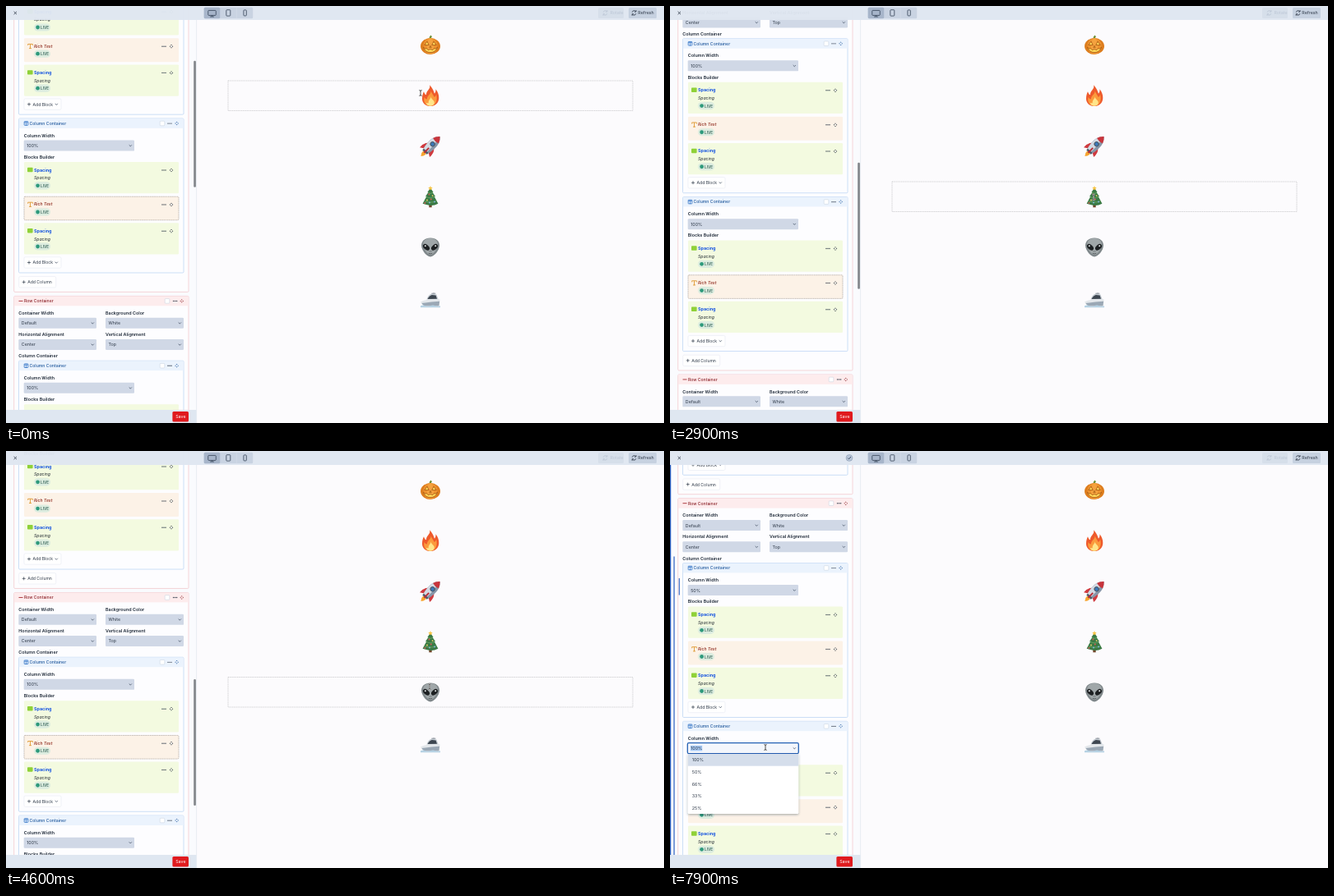
Recreate the animation shown at these times as an HTML page. Size 800 by 508 pixels, loop 8 s.

```html
<!DOCTYPE html>
<html lang="en">
<head>
<meta charset="utf-8">
<title>Block builder preview</title>
<style>
html, body { margin: 0; width: 100%; height: 100%; overflow: hidden; background: #fcfbfd; }
svg { display: block; width: 800px; height: 508px; }
text { font: 400 5.35px Inter, Roboto, sans-serif; fill: #2f3a49; white-space: pre; }
.label { font-weight: 600; font-size: 5.45px; fill: #202b39; }
.button { font-weight: 400; font-size: 5.1px; }
.column { font-weight: 500; font-size: 5.2px; fill: #235a9e; }
.row { font-weight: 500; font-size: 5.1px; fill: #8c2329; }
.spacing { font-weight: 700; font-size: 5.4px; fill: #1553e0; }
.rich { font-weight: 500; font-size: 5.1px; font-style: italic; fill: #8e2a1d; }
.italic { font-style: italic; font-size: 5.1px; fill: #20282f; }
.live { font-weight: 500; font-size: 4.7px; fill: #2b5b50; }
.white { fill: #fff; }
.pale { fill: #bcc6d5; }
</style>
</head>
<body>
<svg id="stage" viewBox="0 0 800 508" xmlns="http://www.w3.org/2000/svg"></svg>
<script>
const ROW_HEIGHT = 488, COLUMN_HEIGHT = 192.8, LOOP = 8000;

const rect = (x, y, w, h, fill, extra = '') =>
  `<rect x="${x}" y="${y}" width="${w}" height="${h}" fill="${fill}" ${extra}/>`;
const path = (d, fill, extra = '') => `<path d="${d}" fill="${fill}" ${extra}/>`;
const line = (d, color, width = 0.7, extra = '') =>
  path(d, 'none', `stroke="${color}" stroke-width="${width}" ${extra}`);
const circle = (x, y, r, fill, extra = '') => `<circle cx="${x}" cy="${y}" r="${r}" fill="${fill}" ${extra}/>`;
const ellipse = (x, y, rx, ry, fill, extra = '') =>
  `<ellipse cx="${x}" cy="${y}" rx="${rx}" ry="${ry}" fill="${fill}" ${extra}/>`;
// y is the vertical middle of the text
const text = (x, y, str, cls = '', extra = '') =>
  `<text x="${x}" y="${y + 1.9}" class="${cls}" ${extra}>${str}</text>`;
const group = (x, y, body, extra = '') => `<g transform="translate(${x} ${y})" ${extra}>${body}</g>`;
const chevron = (x, y) => line(`M${x - 1.6} ${y - .8}l1.6 1.6 1.6-1.6`, '#3f4d60', 0.75);
const plus = (x, y) => line(`M${x - 2} ${y}h4M${x} ${y - 2}v4`, '#2f3a49', 0.7);
const dots = (x, y) => [-2, 0, 2].map(d => circle(x + d, y, 0.7, '#2f3a49')).join('');
const mover = (x, y, color = '#1f2937') => [[0, -1], [1, 0], [0, 1], [-1, 0]].map(([a, b]) =>
  path(`M${x + a * 2.2} ${y + b * 2.2}l${-a + b} ${-b + a}l${-2 * b} ${-2 * a}z`, color)).join('');
const checkbox = (x, y) => rect(x - 2.8, y - 2.8, 5.6, 5.6, '#fff', 'rx=".8" stroke="#c3cedc" stroke-width=".5"');

const select = (x, y, w, value, id = '') =>
  rect(x, y - 6.5, w, 13, '#d0d8e6', 'rx="1.2"') +
  text(x + 3.5, y, value, '', id && `id="${id}"`) + chevron(x + w - 4.7, y);
const button = (x, y, w, label) =>
  rect(x, y - 6.7, w, 13.4, '#fff', 'rx="1.5" stroke="#e6eaf1" stroke-width=".6"') +
  plus(x + 6, y) + text(x + 10.5, y, label, 'button');
const badge = y =>
  rect(34, y - 4.6, 20, 9.2, '#dcecdf', 'rx="4.6"') +
  circle(38.6, y, 2.4, '#2f9a7c') + text(42, y + .1, 'LIVE', 'live');

const spacingBlock = y =>
  rect(22, y, 188, 38.3, '#f3fae0', 'rx="1.2"') +
  rect(26, y + 6.8, 6.6, 5.4, '#8fd138', 'rx=".8"') +
  text(34, y + 9.6, 'Spacing', 'spacing') + text(34, y + 19.4, 'Spacing', 'italic') +
  badge(y + 28.8) + dots(192, y + 10) + mover(201, y + 10);
const richBlock = (y, id) =>
  rect(22, y, 188, 29, '#fcf2e7', 'rx="1.2"') +
  line(`M26.7 ${y + 8.8}v-1.6h5.6v1.6M29.5 ${y + 7.2}v5.4M28 ${y + 12.4}h3`, '#e09a35', 0.9) +
  text(34, y + 9.5, 'Rich Text', 'rich') + badge(y + 19) + dots(192, y + 10) + mover(201, y + 10) +
  rect(22, y + .2, 188, 28.6, 'none',
    `id="${id}" rx="1.2" stroke="#958d86" stroke-width=".6" stroke-dasharray="1.4 .8"`);

const column = (r, c) => group(0, c * COLUMN_HEIGHT,
  rect(15.5, 136.5, 200.5, 188, '#fdfdff', 'rx="1.2" stroke="#b7d2f3" stroke-width=".7"') +
  rect(15.8, 136.8, 199.9, 11.6, '#ebf3fd') +
  rect(22.2, 140.2, 4.6, 4.6, 'none', 'rx=".5" stroke="#2b6fc4" stroke-width=".8"') +
  line('M22.2 141.4h4.6M24.5 141v4', '#2b6fc4') +
  text(28.4, 142.5, 'Column Container', 'column') +
  checkbox(190, 142.5) + dots(199, 142.6) + mover(207.6, 142.5, '#235a9e') +
  text(21.7, 157.2, 'Column Width', 'label') + select(21.7, 169.6, 134.3, '100%', `value${r}${c}`) +
  text(21.7, 183.5, 'Blocks Builder', 'label') +
  spacingBlock(189.5) + richBlock(231.5, `focus${r}${c}`) + spacingBlock(263.7) +
  button(22, 312, 45, 'Add Block') + chevron(61.3, 312));

const row = r => group(0, r * ROW_HEIGHT - 35,
  rect(9.7, 57.7, 212.3, 483, '#fdfdff', 'rx="1.2" stroke="#f3c3c7" stroke-width=".7"') +
  rect(10, 58, 211.7, 11.6, '#fdeced') +
  line('M15.5 63.7h5', '#a52a30', 0.9) + text(22, 63.7, 'Row Container', 'row') +
  checkbox(196, 63.7) + dots(205.6, 63.7) + mover(213.7, 63.7, '#8c2329') +
  text(15.3, 78.4, 'Container Width', 'label') + select(15.3, 90.6, 94.7, 'Default') +
  text(121, 78.4, 'Background Color', 'label') + select(121, 90.6, 95, 'White') +
  text(15.3, 104.5, 'Horizontal Alignment', 'label') + select(15.3, 116.8, 94.7, 'Center') +
  text(121, 104.5, 'Vertical Alignment', 'label') + select(121, 116.8, 95, 'Top') +
  text(15.3, 130.7, 'Column Container', 'label') +
  column(r, 0) + column(r, 1) + button(15.7, 528.6, 45, 'Add Column'));

const dropdown = `<g id="menu">` +
  rect(21.3, 163.2, 135, 12.9, '#f3f6fc', 'rx="1.5" stroke="#2360b4" stroke-width="1.3"') +
  rect(24.8, 166.3, 14.4, 6.6, '#a9cbf6') + text(25.2, 169.6, '100%') + chevron(151.3, 169.6) +
  rect(21.8, 176.6, 134.4, 72.8, '#fff', 'rx="1.2" filter="url(#shadow)"') +
  rect(21.8, 176.6, 134.4, 14.6, '#d5deeb', 'id="option"') +
  ['100%', '50%', '66%', '33%', '25%'].map((v, i) => text(26.8, 183.9 + i * 14.6, v)).join('') + '</g>';

const carved = 'stroke="#a4510f" stroke-width=".8" stroke-linejoin="round"';
const pumpkin =
  line('M-.3-7.5q-.3-2.4 1.6-3.6', '#6f8f35', 2.4) +
  ellipse(0, 1.4, 12, 10, '#dd7d1e') + ellipse(0, 1.2, 8.6, 9.8, '#ee9330') + ellipse(0, 1, 4, 9.6, '#f4a23f') +
  path('M-7.2 0l3.2-4.4L-1.8 0zM7.2 0L4-4.4 1.8 0zM-1.2 2.8L0 .8l1.2 2z', '#ffd75a', carved) +
  path('M-8.6 2.6l2.6 2 1.6-.6 1.6 2 2.8-1 2.8 1 1.6-2 1.6.6 2.6-2Q6.6 9 0 9T-8.6 2.6z', '#ffd75a', carved);
const fire =
  path('M-1-13C3-9 4-5 5-2.6 6.2-4 6.8-6 6.4-8 9.6-4 10.6 0 10.2 4 9.6 9.5 5 12.8 0 12.8S-9.7 9.5-10 4.4C-10.2 0-9-3-8-5-7.4-3-6.8-1.6-5-1-5.4-6 .8-8-1-13z', '#ee5a2c') +
  path('M.3-6C2-2.6 3.6-.6 4.8 1.6 6.2 1.2 7-.4 7-2 9 6 6.4 12.4 0 12.4-6.8 12.4-8.8 6-7.4 1.6-6.4 3.4-5.4 4-4 4.2-4.6-.6 1.6-2 .3-6z', '#fb9a3c') +
  path('M.6 1C.8 4.6 5 5.2 4.8 8.8 4.6 11.2 2.4 12.4 0 12.4S-5 11-4.8 8.4C-4 9-3 9.2-2.2 8.8-3 5.6.4 4.4.6 1z', '#ffe58a');
const rocket = `<g transform="rotate(44)">` +
  path('M-2.6 10Q-3 13.6 0 16.6 3 13.6 2.6 10z', '#f7a531') +
  path('M-4-2Q-9.5 2.4-8.4 10L-3.5 7zM4-2Q9.5 2.4 8.4 10L3.5 7z', '#cf3a3f') +
  path('M0-16.6C4-13.4 5.8-8 5.6-3 5.4 3 4.6 6.4 3.6 9.6h-7.2C-4.6 6.4-5.4 3-5.6-3-5.8-8-4-13.4 0-16.6z', '#8796a8') +
  path('M0-16.6C-4-13.4-5.8-8-5.6-3-5.4 3-4.6 6.4-3.6 9.6H1.4Q3 0 0-16.6z', '#d3dae3') +
  path('M0-16.6Q-3.6-13.6-4.8-9.4 0-7.8 4.8-9.4 3.6-13.6 0-16.6z', '#c8343b') +
  circle(0, -3.8, 2.6, '#3a78b8', 'stroke="#4a5866" stroke-width="1.1"') +
  rect(-3.8, 7.6, 7.6, 2.4, '#4f5a67') + path('M-1 2.6h2v8.4h-2z', '#b92c35') + '</g>';
const tree =
  rect(-1.7, 8, 3.4, 4.8, '#70462a') +
  path('M0-11L3.6-5.4 2.6-5.6 6-.4 4.6-.8 9.4 8.2Q4.6 10.8 0 10.4T-9.4 8.2L-4.6-.8-6-.4-2.6-5.6-3.6-5.4z', '#3a7a45') +
  line('M-3-5.2Q0-3 3-5.2M-5.4-.2Q0 3 5.4-.2M-7.4 5Q0 8.4 7.4 5', '#6ea765', 0.9) +
  path('M0-13.4l.8 1.8 1.9.2-1.4 1.3.4 1.9L0-9.1l-1.7.9.4-1.9-1.4-1.3 1.9-.2z', '#f6c445') +
  [[-1.6, -3, '#e2585a'], [2.6, -1.4, '#f5d469'], [-4, 4, '#f5d469'], [.8, 3, '#e2585a'], [5, 6, '#7fb9e6'], [-1, 7, '#7fb9e6'], [-6.6, 7.4, '#e2585a']]
    .map(([x, y, c]) => circle(x, y, 0.9, c)).join('');
const alien =
  path('M0-11.5C7-11.5 11-7.4 11-2.4 11 3.6 4.6 11.5 0 11.5S-11 3.6-11-2.4C-11-7.4-7-11.5 0-11.5z', '#7f878a') +
  path('M0-11C5-11 8.8-8 8.8-4 8.4 3 3.4 9 0 9S-8.4 3-8.8-4C-8.8-8-5-11 0-11z', '#a0a7a9') +
  ellipse(-5, -.2, 4.6, 2.9, '#1d2022', 'transform="rotate(42 -5 -.2)"') +
  ellipse(5, -.2, 4.6, 2.9, '#1d2022', 'transform="rotate(-42 5 -.2)"') +
  circle(-6.2, -1.8, 1, '#e9eced') + circle(6.2, -1.8, 1, '#e9eced') +
  line('M-.9 4.4v1M.9 4.4v1M-2.2 7.4q2.2 1 4.4 0', '#4a5052', 0.8);
const boat =
  path('M-4.6-1.4Q-2.4-7 1.6-8.2L7.4-7.4 9.8-1z', '#c4cbd2') +
  path('M-3.4-1.8Q-1.6-5.8 1.8-6.8L6.6-6.2 8-2z', '#3d4650') +
  line('M1.4-8.6h5M4-8.4v-1', '#7b848d', 0.9) +
  path('M-12 1.6Q-4-2.6 11.6-1.6L10.4 6.8H-7.4Q-10.8 4-12 1.6z', '#e3e7eb') +
  path('M-10.6 3.2Q0 1.8 11.2 1L10.4 6.8H-7.4Q-9.4 5.2-10.6 3.2z', '#9ba8b5') +
  path('M-12 6.4q3-1.2 6 0t6 0 6 0 6 0v2h-24z', '#b6d2e4');
const emojis = [pumpkin, fire, rocket, tree, alien, boat]
  .map((art, i) => group(516, [47.6, 109.3, 171, 232.5, 294, 358.8][i], art)).join('');

const device = (x, w, h) =>
  rect(x - w / 2, 8.4 - h / 2, w, h, 'none', 'rx=".8" stroke="#344256" stroke-width=".8"');
const turn = (x, color) =>
  line(`M${x - 2.3} 7.6a2.4 2.4 0 0 1 4.4-.8M${x + 2.3} 9.2a2.4 2.4 0 0 1-4.4 .8M${x + 2.4} 5v2h-2M${x - 2.4} 11.8v-2h2`, color, 0.8);
const toolbar =
  rect(0, 0, 800, 17, '#dfe7f1', 'fill-opacity=".97"') +
  line('M9.6 6.8l3.4 3.4M13 6.8l-3.4 3.4', '#2b3545', 0.8) +
  rect(240.7, 1.7, 59.5, 13.6, '#c9d3e2', 'rx="1.6"') + rect(240.7, 1.7, 19.5, 13.6, '#a7b5ca', 'rx="1.6"') +
  line('M280.3 1.7v13.6', '#d9e1ec', 0.5) +
  device(250.5, 9.5, 6) + line('M248 13h5M250.5 11.4v1.6', '#344256', 0.8) +
  device(270.3, 5, 7.4) + device(290.6, 3.4, 7) +
  rect(720, 2, 31, 13, '#d6dfea', 'rx="1.5"') + turn(728.5, '#bcc6d5') + text(734.5, 8.5, 'Rotate', 'pale') +
  rect(757, 2, 34, 13, '#c6d1e0', 'rx="1.5"') + turn(763.6, '#2b3545') + text(768.3, 8.5, 'Refresh');

const changed = `<g id="changed">` +
  rect(0, 17, 1.2, 475, '#2a5fc0') + rect(4.4, 128.5, 1.2, 363.5, '#2a5fc0') + rect(10.7, 155, 1.1, 20.5, '#2a5fc0') + '</g>';
const saved = `<g id="saved">` + circle(218, 8.4, 3.9, '#b9c7da', 'stroke="#7f90a8" stroke-width=".5"') +
  line('M216.2 8.5l1.3 1.4 2.4-2.9', '#33455f', 0.9) + '</g>';
const beam = 'M-1.6-3.4q1.6 0 1.6 1 0-1 1.6-1M0-2.6v5.2M-1.6 3.4q1.6 0 1.6-1 0 1 1.6 1';

const stage = document.getElementById('stage');
stage.innerHTML =
  `<defs><filter id="shadow" x="-10%" y="-10%" width="120%" height="130%">
    <feDropShadow dx="0" dy="1" stdDeviation="1.5" flood-color="#1f2d3d" flood-opacity=".4"/></filter></defs>` +
  rect(0, 0, 800, 508, '#fcfbfd') + rect(0, 0, 231.5, 508, '#fafbfe') +
  `<g id="doc">${row(0) + row(1) + row(2)}</g>` + changed + dropdown +
  rect(228.2, 0, 2.7, 154, '#83868b', 'id="thumb" rx="1.3"') +
  line('M231.6 17v491', '#e0e5ee', 0.7) +
  rect(0, 492, 231.5, 16, '#dfe7f1') + rect(202.4, 494, 19.6, 12.6, '#e01a1e', 'rx="1.5"') +
  text(206.2, 500.4, 'Save', 'white') +
  toolbar + saved + emojis +
  rect(270, 0, 492, 36.5, 'none', 'id="hover" stroke="#bdbdc1" stroke-width=".7" stroke-dasharray="1.3 .9"') +
  `<g id="cursor">${line(beam, '#fff', 1.5) + line(beam, '#1c1c1c', 0.8)}</g>`;

const $ = id => document.getElementById(id);
const show = (id, on) => $(id).setAttribute('visibility', on ? 'visible' : 'hidden');
const clamp = v => Math.min(1, Math.max(0, v));
const ease = v => { v = clamp(v); return v * v * (3 - 2 * v); };

// start time, from, to
const SCROLL_START = 157.3, SCROLL_TIME = 600;
const scrolls = [[1200, SCROLL_START, 453], [2600, 453, 645.5], [4256, 645.5, 941]];
const scrollAt = t => scrolls.reduce(
  (s, [at, from, to]) => s + (to - from) * ease((t - at) / SCROLL_TIME), SCROLL_START);

// The scrollbar stays a moment after scrolling, then fades
function thumbOpacity(t) {
  const ends = [-200, ...scrolls.filter(s => t > s[0] + 50).map(s => s[0] + SCROLL_TIME)];
  return 1 - clamp((t - ends.at(-1) - 500) / 250);
}

// time, x, y
const cursorPath = [
  [0, 504, 106], [700, 504, 106], [1050, 507, 166], [1400, 507, 166], [1800, 513, 173], [2250, 513, 173],
  [2550, 515, 233], [3900, 515, 233], [4200, 515, 287], [4950, 515, 287], [5650, 135, 172],
  [6550, 135, 172], [6800, 62, 199], [7050, 62, 199], [7500, 116, 361]
];
function cursorAt(t) {
  const i = cursorPath.findLastIndex(k => k[0] <= t);
  const a = cursorPath[i], b = cursorPath[i + 1] || a;
  const p = a === b ? 0 : ease((t - a[0]) / (b[0] - a[0]));
  return [a[1] + (b[1] - a[1]) * p, a[2] + (b[2] - a[2]) * p];
}

const focused = { focus01: [0, 1150], focus10: [1300, 2600], focus11: [2700, 4260], focus20: [4350, 5650] };
const PICKED = 6950;

function render(t) {
  const scroll = scrollAt(t);
  $('doc').setAttribute('transform', `translate(0 ${-scroll})`);
  $('thumb').setAttribute('y', 17 + scroll * 0.316);
  $('thumb').setAttribute('opacity', thumbOpacity(t));

  for (let r = 0; r < 3; r++) for (let c = 0; c < 2; c++) {
    const [from, to] = focused[`focus${r}${c}`] || [0, 0];
    show(`focus${r}${c}`, t >= from && t < to);
  }

  const [x, y] = cursorAt(t);
  $('cursor').setAttribute('transform', `translate(${x} ${y})`);
  const slot = Math.floor((y - 29.5) / 61.5), top = 29.5 + slot * 61.5;
  show('hover', x > 270 && y < top + 36.5);
  $('hover').setAttribute('y', top);

  const second = t >= 7600;
  show('menu', second || (t >= 5700 && t < PICKED));
  $('menu').setAttribute('transform', `translate(0 ${second ? COLUMN_HEIGHT - .3 : 0})`);
  $('option').setAttribute('y', !second && t > 6650 && y > 191 ? 191.2 : 176.6);
  $('value20').textContent = t >= PICKED ? '50%' : '100%';
  show('changed', t >= PICKED + 50);
  show('saved', t >= PICKED + 250);
}

const start = performance.now();
function tick(now) {
  render(Math.max(0, now - start) % LOOP);
  requestAnimationFrame(tick);
}
render(0);
requestAnimationFrame(tick);
</script>
</body>
</html>
```
